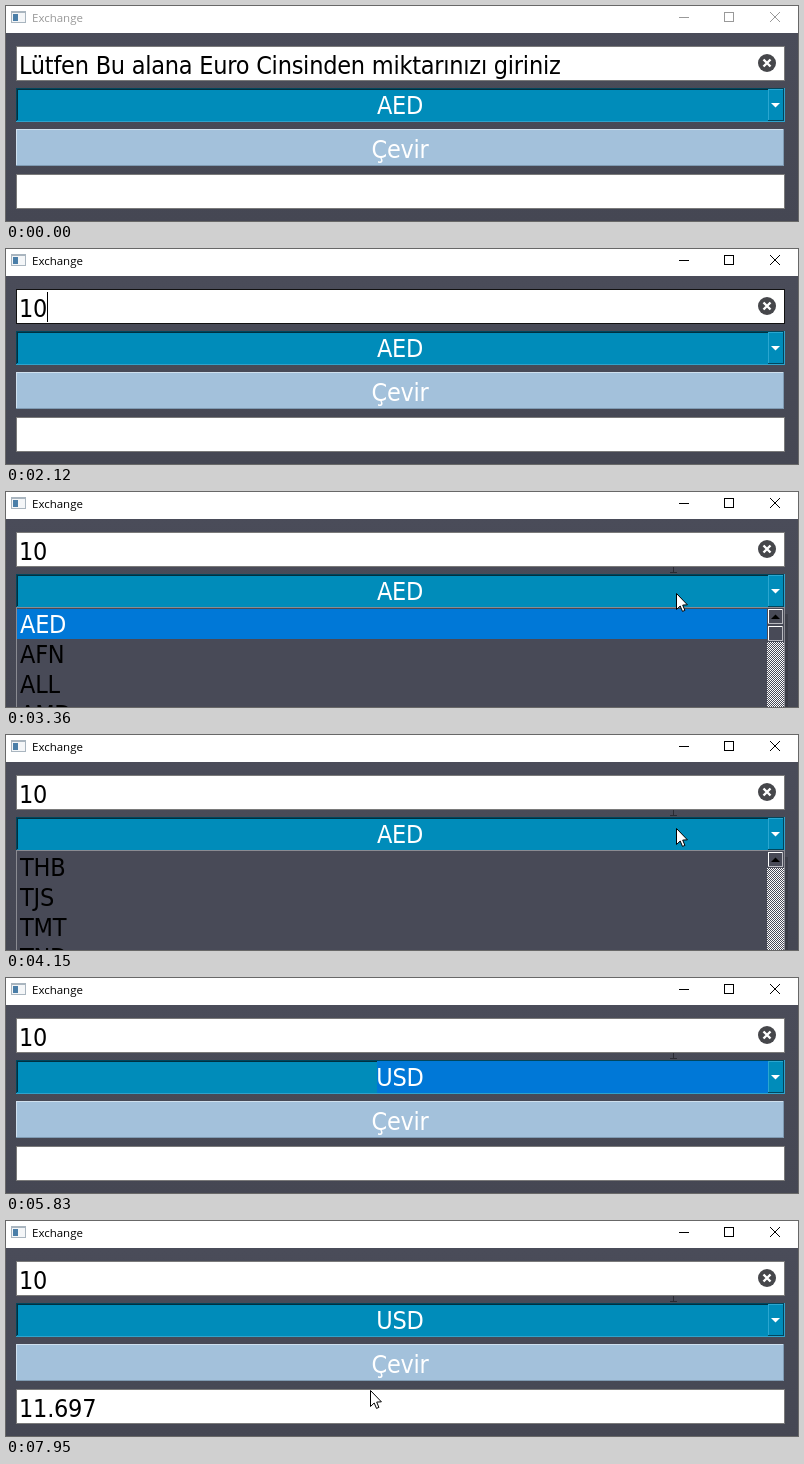
An HTML page with a canvas that plays this animation: 792x215 px, repeating every 8 s.

```html
<!DOCTYPE html>
<html lang="tr">
<head>
<meta charset="utf-8">
<title>Exchange</title>
<style>
  html, body { margin: 0; width: 792px; height: 215px; overflow: hidden; }
  canvas { display: block; }
</style>
</head>
<body>
<canvas id="stage" width="792" height="215"></canvas>
<script>
const LOOP = 8000;
const ctx = document.getElementById('stage').getContext('2d');
const UI = '25px "DejaVu Sans Condensed", "Noto Sans", sans-serif';
const CAPTION = '11.5px "Open Sans", "Noto Sans", sans-serif';
const ACCENT = '#008cba', SELECT = '#0078d7', PANEL = '#484a57', EDGE = '#7a7a7a';
const HINT = 'Lütfen Bu alana Euro Cinsinden miktarınızı giriniz';
const CODES = 'AED AFN ALL AMD THB TJS TMT TND TOP TRY TTD'.split(' ');
const LEFT = 10, WIDTH = 769, ROW = 30;

// Places the pointer visits.
const ENTRY = [735, 182], CLEAR = [759, 54], FIELD = [680, 55], COMBO = [670, 101],
  OPEN = [670, 93], BELOW = [670, 215], RETURN = [505, 212], CONVERT = [415, 144], RESULT = [364, 169];
const clicks = [[680, 830, CLEAR], [1320, 1450, FIELD], [6790, 6920, CONVERT]];

const within = (t, a, b) => t >= a && t < b;
const ramp = (t, a, b) => Math.min(1, Math.max(0, (t - a) / (b - a)));
const linear = k => k, easeIn = k => k * k, easeOut = k => 1 - (1 - k) ** 2;

function rect(x, y, w, h, color) {
  ctx.fillStyle = color;
  ctx.fillRect(x, y, w, h);
}

function frame(x, y, w, h, topLeft, bottomRight = topLeft) {
  rect(x, y, w, 1, topLeft);
  rect(x, y, 1, h, topLeft);
  rect(x, y + h - 1, w, 1, bottomRight);
  rect(x + w - 1, y, 1, h, bottomRight);
}

function cross(x, y, r, color, width) {
  ctx.strokeStyle = color;
  ctx.lineWidth = width;
  ctx.beginPath();
  for (const s of [-1, 1]) {
    ctx.moveTo(x - r, y - s * r);
    ctx.lineTo(x + r, y + s * r);
  }
  ctx.stroke();
}

function triangle(x, y, height, color) {
  ctx.fillStyle = color;
  ctx.beginPath();
  ctx.moveTo(x - 4.5, y);
  ctx.lineTo(x + 4.5, y);
  ctx.lineTo(x, y + height);
  ctx.fill();
}

function disc([x, y], r, color) {
  ctx.fillStyle = color;
  ctx.beginPath();
  ctx.arc(x, y, r, 0, 7);
  ctx.fill();
}

function text(s, x, y, color, align = 'left', font = UI, spacing = -0.24) {
  ctx.font = font;
  ctx.letterSpacing = spacing + 'px';
  ctx.textAlign = align;
  ctx.fillStyle = color;
  ctx.fillText(s, x, y);
}

function titleBar(active) {
  const ink = active ? '#000' : '#999';
  rect(0, 0, 792, 27, '#fff');
  rect(5, 5, 15, 12, '#a9b5bf');
  rect(6, 7, 13, 9, '#f4f6f8');
  rect(7, 8, 5, 7, '#4a7ea8');
  text('Exchange', 26, 16, ink, 'left', CAPTION, 0);
  rect(673, 11, 10, 1, ink);
  frame(718, 6, 10, 10, ink);
  cross(769, 11, 5, ink, 1);
}

function whiteBox(y, edge) {
  rect(LEFT, y, WIDTH, 35, '#fff');
  frame(LEFT, y, WIDTH, 35, edge);
}

function amountField(t) {
  whiteBox(40, within(t, 620, 2800) ? '#111' : EDGE);
  const typed = Math.max(0, Math.floor((t - 1840) / 140));
  const value = t < 830 ? HINT : '10'.slice(0, typed);
  text(value, 13, 68, '#000');
  if (within(t, 830, 1250) || within(t, 1780, 2780)) {
    rect(13 + Math.round(ctx.measureText(value).width), 43, 1, 30, '#000');
  }
  ctx.globalAlpha = t < 1500 ? 1 - ramp(t, 790, 970) : ramp(t, 1930, 2110);
  disc([761, 57], 9, '#46474b');
  cross(761, 57, 3.5, '#fff', 2.4);
  ctx.globalAlpha = 1;
}

function combo(t) {
  rect(LEFT, 82, WIDTH, 34, ACCENT);
  frame(LEFT, 82, WIDTH, 34, '#00465d', '#2fa3cc');
  frame(LEFT + 1, 83, WIDTH - 2, 32, '#00303f', ACCENT);
  if (within(t, 3080, 3200) || within(t, 5830, 6790)) rect(371, 83, 391, 32, SELECT);
  text(t < 5830 ? 'AED' : 'USD', 394, 108, '#fff', 'center');
  rect(762, 83, 16, 32, ACCENT);
  frame(762, 83, 16, 32, '#2aa6d0', '#00465d');
  triangle(769.5, 97, 4.5, '#fff');
}

function button(pressed) {
  const edges = ['#cfe0ee', '#7f9ab2'];
  rect(LEFT, 123, WIDTH - 1, 37, pressed ? '#8fb0cd' : '#a3c1db');
  frame(LEFT, 123, WIDTH - 1, 37, ...(pressed ? edges.reverse() : edges));
  text('Çevir', 394, 152, '#fff', 'center');
}

function resultField(t) {
  whiteBox(168, EDGE);
  if (t >= 7120) text('11.697', 13, 196, '#000');
}

function makeChecker() {
  const tile = document.createElement('canvas');
  tile.width = tile.height = 2;
  const c = tile.getContext('2d');
  for (let i = 0; i < 4; i++) {
    const x = i % 2, y = i >> 1;
    c.fillStyle = x === y ? '#fff' : PANEL;
    c.fillRect(x, y, 1, 1);
  }
  return ctx.createPattern(tile, 'repeat');
}
const checker = makeChecker();

function bevel(y) {
  rect(761, y, 17, 17, PANEL);
  frame(762, y + 1, 15, 15, '#fff', '#b9bac0');
}

function popup(t) {
  const first = t < 4150 ? 0 : t < 4220 ? 4 : 7;
  const current = t < 4150 ? 0 : within(t, 4820, 4890) ? 1 : -1;
  ctx.save();
  ctx.beginPath();
  ctx.rect(0, 115, 792, 100 * ramp(t, 3180, 3350));
  ctx.clip();
  rect(779, 122, 3, 93, 'rgba(0,0,0,.14)');
  rect(LEFT, 115, WIDTH, 110, PANEL);
  frame(LEFT, 115, WIDTH, 110, '#8a8b92');
  for (let i = 0; i < 4; i++) {
    const on = i === current;
    if (on) rect(11, 117 + i * ROW, 750, ROW, SELECT);
    text(CODES[first + i], 14, 141 + i * ROW, on ? '#fff' : '#000');
  }
  rect(761, 116, 17, 99, checker);
  bevel(116);
  triangle(769.5, 127, -4.5, '#000');
  if (first === 0) bevel(133);
  ctx.restore();
}

function pointerAt(t) {
  const glide = (a, b, from, to, ease = linear) => {
    const k = ease(ramp(t, a, b));
    return from.map((v, i) => Math.round(v + (to[i] - v) * k));
  };
  if (t < 70) return null;
  if (t < 830) return glide(70, 680, ENTRY, CLEAR, easeOut);
  if (t < 1980) return glide(830, 1250, CLEAR, FIELD, easeOut);
  if (t < 2780) return null;
  if (t < 3490) return glide(2780, 3080, FIELD, COMBO);
  if (t < 4810) return glide(3490, 3560, COMBO, OPEN);
  if (t < 4890) return glide(4780, 4890, OPEN, BELOW);
  if (t < 6100) return null;
  if (t < 7120) return glide(6100, 6760, RETURN, CONVERT, easeOut);
  return glide(7120, 7950, CONVERT, RESULT, easeIn);
}

function beam(x, y) {
  rect(x, y - 7, 1, 15, '#333');
  for (const dy of [-8, 8]) {
    for (const dx of [-3, 1]) rect(x + dx, y + dy, 3, 1, '#333');
  }
}

const arrowShape = new Path2D('M.5 .5V16.5L4.2 13L6.5 18.4L8.9 17.4L6.7 12.1L11.4 11.8Z');

function arrow(x, y) {
  ctx.save();
  ctx.translate(x, y);
  ctx.fillStyle = '#fff';
  ctx.strokeStyle = '#000';
  ctx.lineWidth = 1;
  ctx.fill(arrowShape);
  ctx.stroke(arrowShape);
  ctx.restore();
}

function draw(t) {
  const shade = ctx.createLinearGradient(0, 27, 0, 215);
  shade.addColorStop(0, '#4a4c59');
  shade.addColorStop(1, '#454753');
  rect(0, 27, 792, 188, shade);
  titleBar(t >= 680);
  amountField(t);
  combo(t);
  button(within(t, 6790, 6920));
  resultField(t);
  if (t >= 2850) {
    rect(667, 75, 1, 5, '#2a2b33');
    rect(664, 80, 7, 1, '#2a2b33');
  }
  if (within(t, 3180, 5830)) popup(t);

  ctx.globalCompositeOperation = 'multiply';
  for (const [a, b, spot] of clicks) if (within(t, a, b)) disc(spot, 15, '#ffff80');
  ctx.globalCompositeOperation = 'source-over';

  const p = pointerAt(t);
  if (p) {
    const overText = p[0] < 748 && within(p[1], 41, 75);
    (overText ? beam : arrow)(...p);
  }
}

const start = performance.now();
function tick() {
  draw((performance.now() - start) % LOOP);
  requestAnimationFrame(tick);
}
tick();
</script>
</body>
</html>
```
